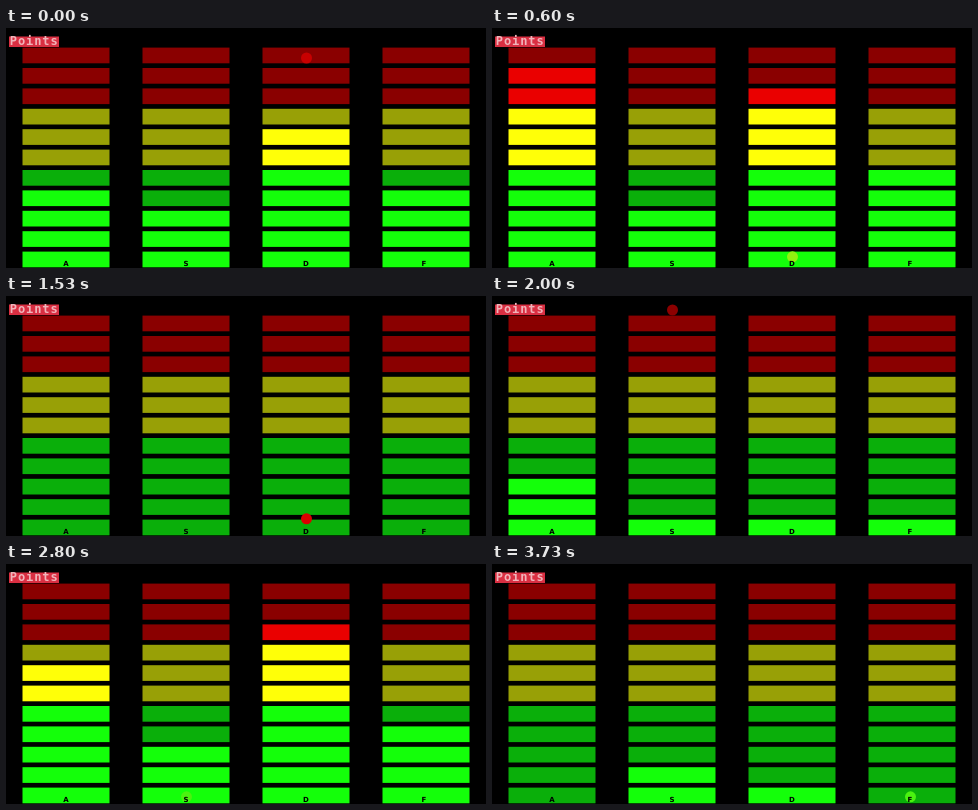
An HTML page with a canvas for the animation above (3790 ms loop, 480x240 px).

```html
<!DOCTYPE html>
<html lang="en">
<head>
<meta charset="utf-8">
<title>Rhythm lanes</title>
<style>
html, body { margin: 0; height: 100%; overflow: hidden; background: #000; }
canvas { display: block; }
</style>
</head>
<body>
<canvas id="stage" width="480" height="240"></canvas>
<script>
const ctx = document.getElementById('stage').getContext('2d');
const LOOP = 3790, STEPS = 57, ROWS = 11;
const LANES = ['A', 'S', 'D', 'F'];

// Lit segments per lane, keyed by step
const LEVELS = [
  [0, 4, 3, 7, 4],
  [9, 10, 3, 9, 5],
  [15, 4, 3, 4, 4],
  [23, 0, 0, 0, 0],
  [30, 3, 1, 1, 1],
  [42, 7, 3, 9, 4],
  [56, 0, 2, 1, 0]
];

// One falling note per beat
const NOTES = [
  { lane: 2, start: -1 },
  { lane: 2, start: 14, ring: true },
  { lane: 1, start: 30 },
  { lane: 3, start: 44 }
];

const laneX = lane => 16.5 + lane * 120;
const keyX = lane => laneX(lane) + (lane === 3 ? 42 : 44);

function levelAt(step, lane) {
  const next = Math.max(1, LEVELS.findIndex(key => key[0] >= step));
  const a = LEVELS[next - 1], b = LEVELS[next];
  const p = (step - a[0]) / (b[0] - a[0]);
  return Math.round(a[lane + 1] + (b[lane + 1] - a[lane + 1]) * p);
}

function segmentColor(row, lit) {
  if (row < 5) return lit ? '#14ff0a' : '#0aaf0a';
  if (row < 8) return lit ? '#ffff08' : '#98a006';
  return lit ? '#ea0000' : '#8a0000';
}

function drawLane(lane, level) {
  for (let row = 0; row < ROWS; row++) {
    ctx.fillStyle = segmentColor(row, row < level);
    ctx.fillRect(laneX(lane), 223.6 - row * 20.4, 87, 15.7);
  }
}

// Falls under gravity, then settles on its key
function noteY(age) {
  return age <= 9 ? 14 + 15.1 * age + .9 * age * age
                  : 234 - 11 * Math.exp(-.75 * (age - 9));
}

function noteColor(age) {
  if (age <= 9) return `rgb(${Math.min(220, 140 + age * 60)},0,0)`;
  return `rgb(${Math.max(60, 145 - (age - 10) * 35)},242,16)`;
}

function drawNote({ lane, start, ring }, step) {
  const age = step - start;
  if (age < 0 || age > 13) return;
  const circle = r => {
    ctx.beginPath();
    ctx.arc(keyX(lane), noteY(age), r, 0, Math.PI * 2);
  };
  if (ring && age < 2) {
    ctx.strokeStyle = '#7c8000';
    for (const r of [4.2, 1.8]) { circle(r); ctx.stroke(); }
  } else {
    ctx.fillStyle = noteColor(age);
    circle(5.5);
    ctx.fill();
  }
}

function drawText(text, x, y, font, color, spacing, align) {
  ctx.font = font;
  ctx.letterSpacing = spacing + 'px';
  ctx.textAlign = align;
  ctx.fillStyle = color;
  ctx.fillText(text, x, y);
}

function draw(now) {
  const step = Math.floor(now % LOOP / LOOP * STEPS);
  ctx.fillStyle = '#000';
  ctx.fillRect(0, 0, 480, 240);
  LANES.forEach((_, lane) => drawLane(lane, levelAt(step, lane)));
  NOTES.forEach(note => drawNote(note, step));
  LANES.forEach((key, lane) =>
    drawText(key, keyX(lane) - .5, 238, 'bold 7px "DejaVu Sans", sans-serif', '#000', 0, 'center'));
  ctx.fillStyle = '#d92f42';
  ctx.fillRect(3, 8.5, 50, 10.5);
  drawText('Points', 3.8, 17.3, 'bold 12px "DejaVu Sans Mono", monospace', '#f0b4ba', .9, 'left');
}

const begin = performance.now();
function tick() {
  draw(performance.now() - begin);
  requestAnimationFrame(tick);
}
tick();
</script>
</body>
</html>
```
